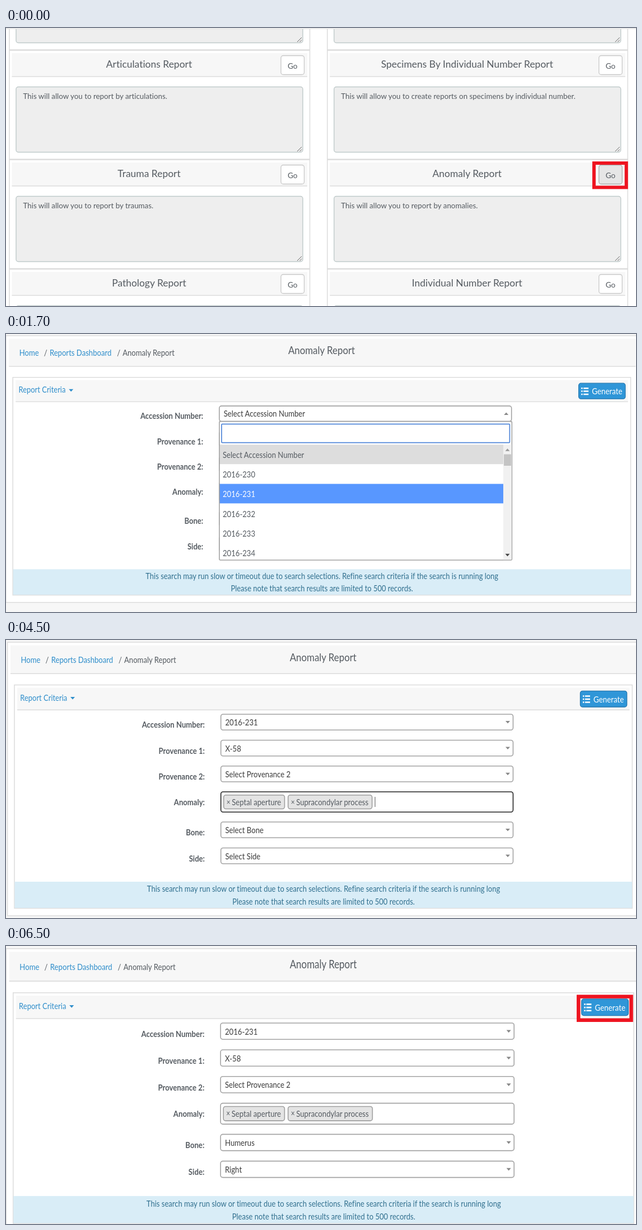
An HTML page that plays this animation: 1125 by 498 pixels, repeating every 8000 ms.

```html
<!DOCTYPE html>
<html lang="en">
<head>
<meta charset="utf-8">
<title>Anomaly report</title>
<style>
  html, body { margin: 0; width: 100%; height: 100%; overflow: hidden; background: #fff; }
  svg { display: block; width: 100%; height: 100%; }
  text { font: 14px Lato, sans-serif; font-variant-ligatures: none; fill: #555b61; white-space: pre; }
  .title { font-size: 18px; }
  .bold { font-weight: 700; }
  .link { fill: #2f8ecb; }
  .white { fill: #fff; }
  .value { fill: #3c3c3c; }
  .info { fill: #31708f; }
  .mid { text-anchor: middle; }
  .end { text-anchor: end; }

  /* Scenes are opaque and stacked; each one covers those before it. */
  .scene { animation: 8s step-end infinite; }
  #accession { animation-name: at500; }
  #provenance { animation-name: at2500; }
  #anomaly { animation-name: at4500; }
  #generate { animation-name: at6500; }
  @keyframes at500 { 0% { visibility: hidden } 6.25%, 100% { visibility: visible } }
  @keyframes at2500 { 0% { visibility: hidden } 31.25%, 100% { visibility: visible } }
  @keyframes at4500 { 0% { visibility: hidden } 56.25%, 100% { visibility: visible } }
  @keyframes at6500 { 0% { visibility: hidden } 81.25%, 100% { visibility: visible } }
</style>
</head>
<body>
<svg id="stage" viewBox="0 0 1125 498" preserveAspectRatio="none"></svg>
<script>
// Boxes are given by their edges: left, top, right, bottom.
const box = (l, t, r, b, fill, stroke = 'none', width = 1.5, radius = 0) =>
  `<rect x="${l}" y="${t}" width="${r - l}" height="${b - t}" rx="${radius}" fill="${fill}" stroke="${stroke}" stroke-width="${width}"/>`;
const path = (d, stroke, width = 1.5) =>
  `<path d="${d}" fill="none" stroke="${stroke}" stroke-width="${width}"/>`;
const text = (x, y, str, cls = '', scale = '.937 1.1') =>
  `<text class="${cls}" transform="translate(${x} ${y}) scale(${scale})">${str}</text>`;
const arrow = (x, y, up, fill = '#888') => {
  const h = up ? -2.3 : 2.3;
  return `<path d="M${x - 4} ${y - h}h8l-4 ${2 * h}z" fill="${fill}"/>`;
};
const scene = (id, body) =>
  `<g class="scene" id="${id}">${box(0, 0, 1125, 498, '#fff')}${body}</g>`;

const GREY = '#f7f7f7', LINE = '#dcdcdc', EDGE = '#a3a3a3', RED = '#ee1420';

// Dashboard of report cards
function card(x, y, name, note, active) {
  const grip = path(`M${x + 514} ${y + 181}l8 -8M${x + 518.5} ${y + 181}l3.5 -3.5`, '#666', 1);
  return box(x, y, x + 536.5, y + 195, '#fff', LINE) +
    box(x + 4.5, y + 5, x + 532, y + 47, GREY) +
    path(`M${x + 4.5} ${y + 47}h527.5`, LINE) +
    text(x + 249.5, y + 31, name, 'title mid', '.97') +
    box(x + 485, y + 9.5, x + 526.5, y + 43.5, active ? '#e6e6e6' : '#fff', active ? '#adadad' : '#c8c8c8', 1.3, 4) +
    text(x + 505.7, y + 32.5, 'Go', 'mid', '.97') +
    box(x + 12, y + 65.5, x + 524, y + 182.5, '#eee', '#bfcaca', 1.4, 4) +
    text(x + 24.5, y + 87, note, '', '.955') + grip;
}

function dashboard() {
  const rows = [
    ['', '', '', ''],
    ['Articulations Report', 'This will allow you to report by articulations.',
     'Specimens By Individual Number Report', 'This will allow you to create reports on specimens by individual number.'],
    ['Trauma Report', 'This will allow you to report by traumas.',
     'Anomaly Report', 'This will allow you to report by anomalies.'],
    ['Pathology Report', '', 'Individual Number Report', '']
  ];
  const cards = rows.map(([a, b, c, d], i) => {
    const y = 40 + 196 * (i - 1);
    return card(6, y, a, b) + card(573.8, y, c, d, i === 2);
  });
  return cards.join('') + box(0, 0, 1125, 1, '#fff') + path('M0 1.3H1125', '#e6e6e6') +
    box(1050, 242, 1107.7, 285.5, 'none', RED, 6);
}

// Report form
const FIELDS = [
  { label: 'Accession Number:', top: 133 },
  { label: 'Provenance 1:', top: 179.5 },
  { label: 'Provenance 2:', top: 225.7 },
  { label: 'Anomaly:', top: 272 },
  { label: 'Bone:', top: 326 },
  { label: 'Side:', top: 372.5 }
];

const tag = (l, r, str) =>
  box(l, 277.7, r, 302.5, '#e4e4e4', '#a0a0a0', 1.6, 4) +
  text(l + 5, 295, '×', '', '.85 1') + text(l + 14.5, 296, str);

function field({ label, top }, value, open, focus) {
  if (label === 'Anomaly:') {
    return text(355, 296, label, 'bold end') +
      box(383.7, top, 905.5, 308.3, '#fff', focus ? '#222' : EDGE, 1.6, 4) +
      tag(388.7, 497.5, 'Septal aperture') + tag(503.7, 653.7, 'Supracondylar process') +
      (focus ? path('M659 281v18', '#555', 1) : '');
  }
  return text(355, top + 24, label, 'bold end') +
    box(383.7, top, 905.5, top + 28.3, '#fff', EDGE, 1.6, 4) +
    text(391.5, top + 20, value, 'value') +
    arrow(896, top + 14.3, open);
}

function form(matrix, values, open, focus) {
  const fields = FIELDS.map((f, i) => field(f, values[i], i === open, focus)).join('');
  const icon = [100.5, 106, 111.5].map(y => path(`M1030 ${y}h2.5m1.5 0h9`, '#fff', 2.6)).join('');
  return box(0, 0, 1125, 498, GREY) + `<g transform="matrix(${matrix})">` +
    box(2.6, 4, 1130, 494, '#fff', LINE) +
    box(8, 9.5, 1127, 60, GREY) + path('M8 60.3H1127', LINE) +
    text(26.5, 40.8, 'Home', 'link') + text(70.5, 40.8, '/') +
    text(80.7, 40.8, 'Reports Dashboard', 'link') + text(201, 40.8, '/') +
    text(211, 40.8, 'Anomaly Report') +
    text(506.7, 37.7, 'Anomaly Report', 'title') +
    box(15, 80.5, 1118.3, 480.5, '#fff', LINE) +
    box(20, 85.5, 1113.5, 125, GREY) + path('M20 125.3H1113.5', LINE) +
    text(25.3, 108.5, 'Report Criteria', 'link', '.925 1.1') + arrow(119, 104.3, false, '#2f8ecb') +
    box(1025.5, 91.3, 1108.7, 120, '#2f96d8', '#2478b0', 1.3, 4) + icon +
    text(1049, 111.8, 'Generate', 'white', '.955 1.1') + fields +
    box(15.5, 433, 1118, 480, '#d9edf7') +
    text(567, 451.3, 'This search may run slow or timeout due to search selections. Refine search criteria if the search is running long', 'info mid', '.927 1.1') +
    text(567, 474, 'Please note that search results are limited to 500 records.', 'info mid', '.927 1.1') +
    '</g>';
}

// Open list: third entry is hovered, first is the current choice.
function list({ l, t, r, b, search, first, pitch, inner = r, items }) {
  const rows = items.map((str, i) => {
    const y = first + i * pitch;
    const fill = ['#ddd', '#fff', '#5897ff'][i] || '#fff';
    return box(l, y, inner, Math.min(y + pitch, b), fill) +
      text(l + 6, y + pitch / 2 + 6.3, str, i === 2 ? 'white' : '', '.937 1.07');
  }).join('');
  return box(l, t, r, b, '#fff') + rows +
    box(l + 4, search, r - 4, search + 33.3, '#fff', '#5086d8', 1.7, 1) +
    box(l, t, r, b, 'none', EDGE, 1.6, 2);
}

const accessionList = list({
  l: 381, t: 156.6, r: 903.4, b: 405, search: 161.3, first: 198.2, pitch: 35.15, inner: 888,
  items: ['Select Accession Number', ...[0, 1, 2, 3, 4].map(n => '2016-23' + n)]
}) + box(888, 198.2, 902.6, 404.2, '#f1f1f1') + box(889, 215.5, 902, 236, '#c4c4c4') +
  arrow(895.5, 207.5, true, '#999') + arrow(895.5, 396, false, '#444');

const provenanceList = list({
  l: 379.6, t: 198.8, r: 898.8, b: 380.3, search: 203.4, first: 240.5, pitch: 34.9,
  items: ['Select Provenance 1', 'X-34', 'X-58', 'X-59']
});

const values = (a, p, bone, side) => [a, p, 'Select Provenance 2', '', bone, side];
const blank = ['Select Bone', 'Select Side'];

document.getElementById('stage').innerHTML =
  scene('dashboard', dashboard()) +
  scene('accession',
    form('1 0 0 .975 -2.8 -.8', values('Select Accession Number', 'Select Provenance 1', ...blank), 0) + accessionList) +
  scene('provenance',
    form('.9943 0 0 .966 -1.8 -2', values('2016-231', 'Select Provenance 1', ...blank), 1) + provenanceList) +
  scene('anomaly',
    form('1 0 0 1 0 0', values('2016-231', 'X-58', ...blank), -1, true)) +
  scene('generate',
    form('1.0045 0 0 1.033 -2.3 .6', values('2016-231', 'X-58', 'Humerus', 'Right'), -1) +
    box(1022.3, 90.6, 1116.5, 132.8, 'none', RED, 6.5));
</script>
</body>
</html>
```
